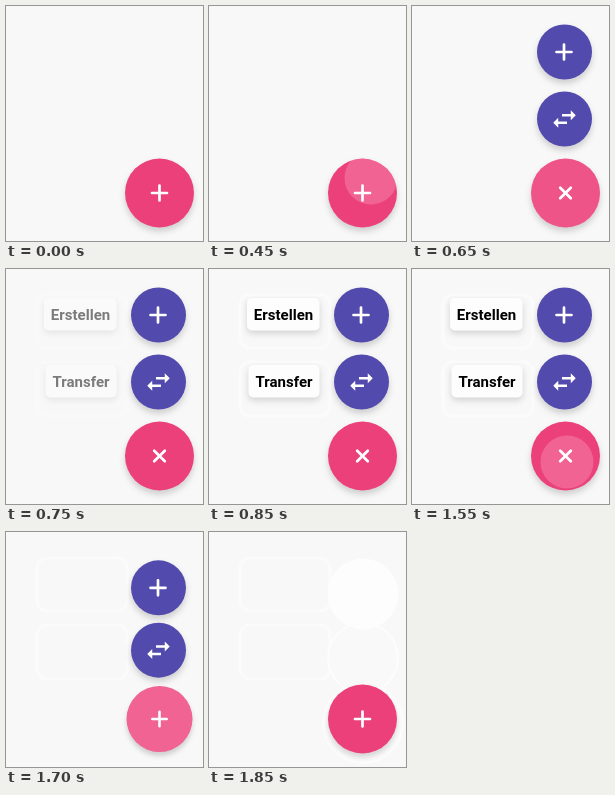
Recreate the animation shown at these times as an HTML page. Size 197 by 235 pixels, loop 2.1 s.

```html
<!DOCTYPE html>
<html lang="de">
<head>
<meta charset="utf-8">
<style>
  html, body { margin: 0; width: 100%; height: 100%; overflow: hidden; background: #f8f8f8; }
  svg { display: block; width: 100%; height: 100%; }
  text { font: 600 15px Roboto, sans-serif; text-anchor: middle; }
  .raised { filter: drop-shadow(0 4px 3px rgba(0, 0, 0, .17)); }
  .card { filter: drop-shadow(0 3px 3px rgba(0, 0, 0, .15)); }
  .halo { fill: none; stroke: #fbfbfb; stroke-width: 3; }
</style>
</head>
<body>
<svg viewBox="0 0 197 235">
  <defs>
    <clipPath id="disc"><circle r="34.5"/></clipPath>
    <path id="plus" d="M-7.5 0H7.5M0 -7.5V7.5" fill="none" stroke="#fff" stroke-width="2.7" stroke-linecap="round"/>
    <path id="swap" transform="scale(1.25) translate(-12 -12)" fill="#fff"
      d="M6.99 11L3 15l3.99 4v-3H14v-2H6.99v-3zM21 9l-3.99-4v3H10v2h7.01v3z"/>
  </defs>

  <g id="labelHalos" class="halo">
    <rect x="31" y="26" width="90" height="53" rx="10"/>
    <rect x="31" y="93" width="90" height="54" rx="10"/>
  </g>
  <g id="buttonHalos">
    <circle cx="154" cy="191" r="41" fill="#fdfdfd"/>
    <circle cx="154" cy="126" r="35" fill="#f9f9f9" stroke="#fdfdfd" stroke-width="2"/>
    <circle cx="154" cy="62" r="35.5" fill="#fdfdfd"/>
  </g>

  <g id="labels">
    <rect class="card" x="38" y="29" width="72.5" height="32.5" rx="5" fill="#fdfdfd"/>
    <text x="74.5" y="51">Erstellen</text>
    <rect class="card" x="39.5" y="96" width="71" height="32.5" rx="5" fill="#fdfdfd"/>
    <text x="75" y="118">Transfer</text>
  </g>

  <g id="create"><circle class="raised" r="27.5" fill="#524aad"/><use href="#plus" x="-.5"/></g>
  <g id="transfer"><circle class="raised" r="27.5" fill="#524aad"/><use href="#swap"/></g>

  <g id="main">
    <circle class="raised" r="34.5" fill="#ec407a"/>
    <g clip-path="url(#disc)"><circle id="ripple" fill="#fff"/></g>
    <use id="icon" href="#plus"/>
  </g>
</svg>
<script>
const LOOP = 2100, STEP = 50, OPEN = 450, CLOSE = 1550;
const MAIN = { x: 153.5, y: 187 };
const el = id => document.getElementById(id);
const set = (id, attrs) => {
  for (const name in attrs) el(id).setAttribute(name, attrs[name]);
};
const ramp = (t, from, to) => Math.min(1, Math.max(0, (t - from) / (to - from)));
const smooth = k => k * k * (3 - 2 * k);

function drawAction(id, restY, t, delay) {
  const entry = ramp(t, OPEN + delay, 650);
  const leaving = ramp(t, CLOSE + 50, 1700);
  const pull = .2 * (1 - entry) ** 2 + .07 * leaving ** 2;
  const y = restY + (MAIN.y - restY) * pull;
  set(id, {
    transform: `translate(152.5 ${y})`,
    opacity: Math.min(1, entry * 1.5) * (1 - ramp(t, 1700, 1800))
  });
}

function drawMain(t) {
  const closing = t >= CLOSE;
  const age = t - (closing ? CLOSE : OPEN);
  const active = age >= 0 && age < 350;
  const press = active ? smooth(ramp(age, 0, 120)) * (1 - ramp(age, 150, 200)) : 0;
  const turn = smooth(ramp(t, OPEN, 630)) - smooth(ramp(t, CLOSE, 1700));
  set("main", { transform: `translate(${MAIN.x} ${MAIN.y}) scale(${1 - .045 * press})` });
  set("icon", { transform: `rotate(${45 * turn})` });
  set("ripple", {
    cx: closing ? 1.5 : 8.5,
    cy: closing ? 6 : -15,
    r: Math.max(0, 26.5 + age * .3),
    opacity: active ? .18 * (1 - ramp(age, 150, 300) ** .8) : 0
  });
}

function draw(t) {
  drawAction("create", 46, t, 50);
  drawAction("transfer", 113, t, 0);
  drawMain(t);
  set("labels", { opacity: ramp(t, 650, 850) * (1 - ramp(t, CLOSE, 1650)) });
  set("labelHalos", { opacity: ramp(t, 650, 850) });
  set("buttonHalos", { opacity: ramp(t, 1700, 1850) });
}

function frame() {
  draw(Math.floor(performance.now() % LOOP / STEP) * STEP);
  requestAnimationFrame(frame);
}
frame();
</script>
</body>
</html>
```
